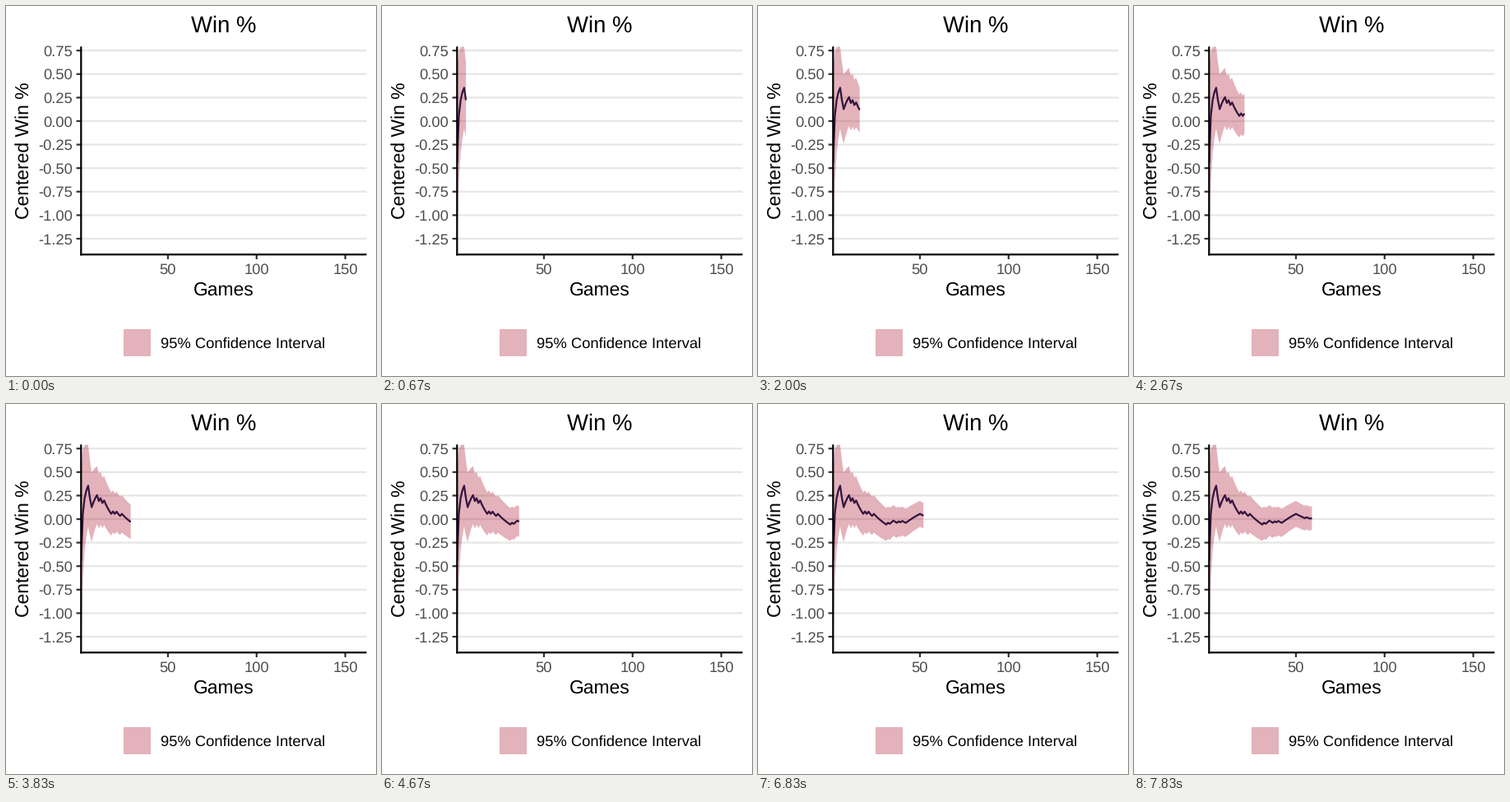
A matplotlib script that plays this animation: 450 px wide and 450 px high, repeating every 8 s.

```python
import numpy as np
import matplotlib.pyplot as plt
from matplotlib.animation import FuncAnimation
from matplotlib.patches import Polygon, Rectangle

plt.rcParams.update({
    "font.family": "Liberation Sans",
    "text.hinting": "none",
    "text.hinting_factor": 8,
    "path.simplify": False,
    "path.snap": False,
})

SIZE, LOOP = 450, 8000
STEPS, TICKS = 48, 5      # reveal steps per loop, frames per step
PACE = 161 / 130          # games revealed per step
CENTER = 72 / 162         # season win rate
PINK, INK = "#aa162e", "#33143f"
GRID, TICK, LABEL = "#e6e6e6", "#333333", "#4d4d4d"
LW = 2.22

RESULTS = ("LWWWWLLWWWLWLWLLLLWLWLLW" + "L" * 7 + "WLWWLLWLWLL"
           + "W" * 8 + "L" * 5 + "WLLW")


def px(game):
    return 91.3 + (game - 1) * 2.1565


def py(value):
    return 140.0 - value * 114.4


games = np.arange(1, len(RESULTS) + 1)
wins = np.cumsum([r == "W" for r in RESULTS])
rate = wins / games - CENTER
half = 1.96 * np.sqrt(CENTER * (1 - CENTER) / games)
xs, mid = px(games), py(rate)
top, bottom = py(rate + half), py(rate - half)

LEFT, RIGHT = px(1), px(162)
TOP, BOTTOM = top.min(), bottom.max()

fig = plt.figure(figsize=(SIZE / 72, SIZE / 72), dpi=72, facecolor="white")
ax = fig.add_axes([0, 0, 1, 1])
ax.set(xlim=(0, SIZE), ylim=(SIZE, 0))
ax.axis("off")


def rule(x, y, color, z):
    ax.plot(x, y, color=color, lw=LW, solid_capstyle="butt", zorder=z)


def label(x, y, text, size, color="black", ha="center", rotation=0):
    ax.text(x, y, text, fontsize=size, color=color, ha=ha, va="baseline",
            rotation=rotation, rotation_mode="anchor")


for i in range(9):
    value = 0.75 - 0.25 * i
    y = py(value)
    rule([LEFT, RIGHT], [y, y], GRID, 1)
    rule([LEFT - 5.7, LEFT], [y, y], TICK, 4)
    label(81, y + 6.5, f"{value:.2f}", 18.33, LABEL, "right")

for game in (50, 100, 150):
    x = px(game)
    rule([x, x], [BOTTOM, BOTTOM + 5.7], TICK, 4)
    label(x, 325.8, str(game), 18.33, LABEL)

rule([LEFT, LEFT], [TOP, BOTTOM + LW / 2], "black", 5)
rule([LEFT - LW / 2, RIGHT], [BOTTOM, BOTTOM], "black", 5)

label((LEFT + RIGHT) / 2, 32, "Win %", 27.5)
label((LEFT + RIGHT) / 2, 351.5, "Games", 22.92)
label(28, (TOP + BOTTOM) / 2, "Centered Win %", 22.92, rotation=90)

ax.add_patch(Rectangle((143, 393), 33, 33, fc=PINK, alpha=0.33, lw=0))
label(188.4, 416.2, "95% Confidence Interval", 18.33, ha="left")

panel = Rectangle((LEFT, TOP), RIGHT - LEFT, BOTTOM - TOP,
                  transform=ax.transData)
band = Polygon([[0, 0]] * 3, fc=PINK, alpha=0.33, lw=0, zorder=2)
ax.add_patch(band)
band.set_clip_path(panel)
line, = ax.plot([], [], color=INK, lw=LW, solid_capstyle="butt",
                solid_joinstyle="round", zorder=3)
line.set_clip_path(panel)


def draw(frame):
    # each step starts one frame early, so rounded clock times land inside it
    step = min((frame + 1) // TICKS, STEPS - 1)
    n = round(1 + step * PACE)
    band.set_visible(n > 1)
    line.set_visible(n > 1)
    x = xs[:n]
    band.set_xy(np.column_stack([
        np.concatenate([x, x[::-1]]),
        np.concatenate([top[:n], bottom[:n][::-1]]),
    ]))
    line.set_data(x, mid[:n])
    return band, line


FRAMES = STEPS * TICKS
anim = FuncAnimation(fig, draw, frames=FRAMES, interval=LOOP / FRAMES,
                     repeat=True, repeat_delay=0, blit=False)
plt.show()
```
